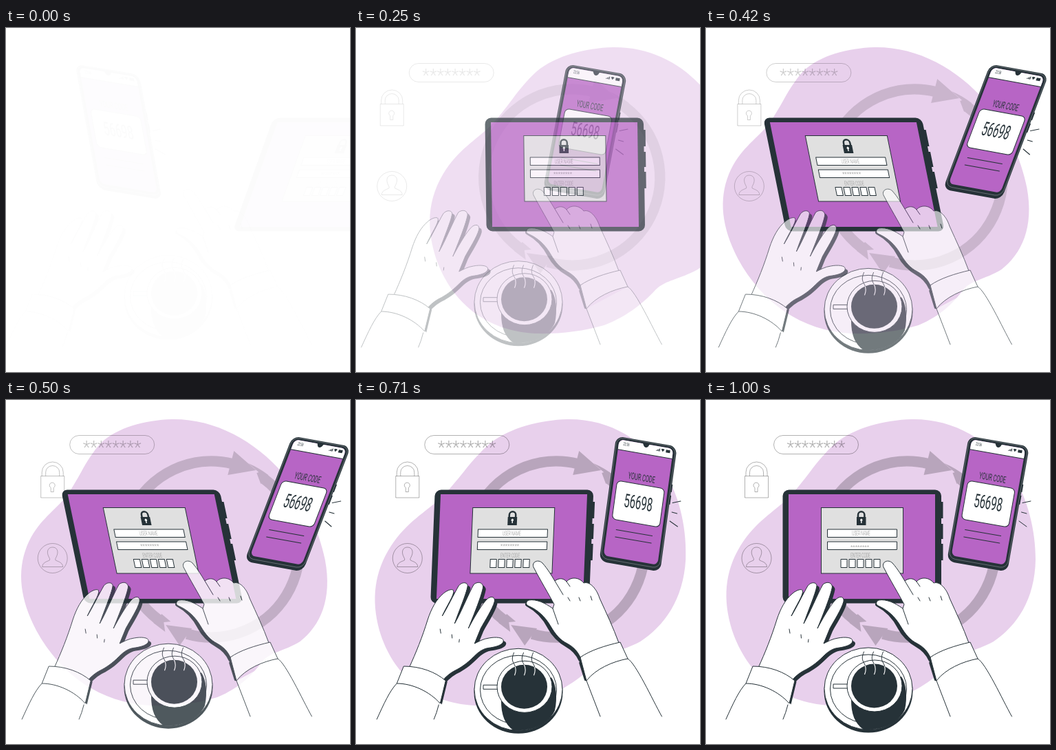
Write an HTML page that moves like this. It is 500x500 px and loops after 1040 ms.

```html
<!DOCTYPE html>
<html lang="en">
<head>
<meta charset="utf-8">
<title>Two-step sign in</title>
<style>
  html, body { margin: 0; width: 100%; height: 100%; overflow: hidden; background: #fff; }
  svg { display: block; width: 100vw; height: 100vh; }
  text { font-family: Roboto, "Liberation Sans", sans-serif; text-anchor: middle; }
  .ink { fill: #263238; }
  .line { fill: none; stroke: #263238; stroke-width: 1; stroke-linecap: round; stroke-linejoin: round; }
  .paper { fill: #fff; stroke: #263238; stroke-width: 1; stroke-linejoin: round; }
  .screen { fill: #b765c5; }
  .faint { fill: none; stroke: #000; stroke-opacity: .3; stroke-width: 1; }
  .label { fill: #8c8c8c; font-size: 9px; font-weight: 300; }
</style>
</head>
<body>
<svg viewBox="0 0 500 500">
  <defs>
    <path id="palm" d="M76 389C86 367 95 345 103 319C108 304 115 290 126 281C132 276 139 274 140.500 277C142 283 130 300 124 314C131 303 141 282 148 270C152 265 159 264 161 269C161 277 149 305 142 325C150 312 163 280 170 268C175 264 182 264 183.500 271C182 283 170 312 162 332C170 317 183 294 191 288C196 285 201 286 200 293C197 304 186 321 180 332L171 354C177 351 184 347 192 346C202 344 213 345 213 350C213 356 201 359 194 360C184 361 178 365 170 373C160 383 151 389 143 393C135 397 130 402 126 406Z"/>
    <path id="cuffL" d="M68 387C92 387 114 395 129 408L121 441C106 424 81 412 58 412Z"/>
    <path id="steam" d="M229.500 366c-3 7-3 11 0 16s4 10 1 17M243.500 366c-3 7-3 11 0 16s4 10 1 17M257.500 366c-3 7-3 11 0 16s4 10 1 17"/>
    <clipPath id="inCup"><ellipse cx="244.500" cy="415.500" rx="33.500" ry="32"/></clipPath>
  </defs>

  <g id="blob">
    <path fill="#e8d0ec" d="M299 28C360 27 412 58 445 108C468 143 479 190 479 232C478 290 452 328 418 351C390 366 372 366 357 380C342 396 318 418 281 432C250 441 215 445 180 444C110 440 60 400 38 335C24 290 27 250 50 212C72 177 98 163 119 143C145 117 158 90 188 63C216 40 260 29 299 28Z"/>
  </g>

  <g id="ring">
    <g opacity=".2" transform="translate(1.500 0)">
      <path id="arcs" fill="none" stroke="#000" stroke-width="15.500"/>
      <path d="M324 74L356 102L315 109ZM345 92Q361 99 374 109L363 122L357 106L360 105Z"/>
      <path d="M225 327L263 332L245 357ZM232 322L219 311L207 324L224 337L222 323Z"/>
    </g>
  </g>

  <g id="icons">
    <rect class="faint" x="98.500" y="51.500" width="123" height="27" rx="13.500"/>
    <text x="160" y="78.300" font-size="25" font-weight="300" fill-opacity=".31">********</text>
    <path class="faint" d="M56.500 110.500h34v31.500h-34zM58 110.500V105a15.500 15 0 0 1 31 0v5.500M63.500 110.500V105a10 9.500 0 0 1 20 0v5.500"/>
    <path class="faint" d="M71 127.500a4 4 0 1 1 4 0v6h-4z"/>
    <circle class="faint" cx="73.500" cy="230" r="21.500"/>
    <path class="faint" d="M58.500 242.500C59 236 65 235 69 233C70 231 69 230 68 228C64 220 67 214 73.500 214S83 220 79 228C78 230 77 231 78 233C82 235 88 236 88.500 242.500Z"/>
  </g>

  <g id="phone">
    <g transform="translate(410 151) rotate(10) scale(1.015)">
      <path class="ink" d="M42-36h3v11h-3zM42-20h3v13h-3z"/>
      <rect class="ink" x="-44" y="-91" width="88" height="182" rx="11"/>
      <rect x="-42.500" y="-89.700" width="85" height="176" rx="10" fill="none" stroke="#9aa0a3" stroke-width=".5"/>
      <rect class="screen" x="-39" y="-87" width="78" height="169" rx="7"/>
      <path fill="#fff" d="M-39-72.500V-80a7 7 0 0 1 7-7h64a7 7 0 0 1 7 7v7.500z"/>
      <path class="line" d="M-39-72.500h78"/>
      <path class="ink" d="M-6-88c2 0 2 6 6 6s4-6 6-6z"/>
      <text class="ink cond" data-x="-28" data-y="-79.500" font-size="6.500">23:56</text>
      <path class="ink" d="M15-80v-1h1v1zM16.500-80v-2h1v2zM18-80v-3h1v3zM19.500-80v-4h1v4zM22-83.500q2.500-1.500 5 0l-2.500 3.500zM29-84h6v4h-6z"/>
      <text class="ink cond" data-x="0" data-y="-33.500" font-size="13.400">YOUR CODE</text>
      <rect class="paper" x="-34" y="-28" width="68.500" height="56" rx="6"/>
      <text class="ink cond" data-x="0" data-y="7.500" font-size="27">56698</text>
      <path class="line" d="M-26 42h52M-26 52.500h52"/>
    </g>
    <path class="line" d="M460 149.500L472 147M458.500 163L466 165M455 176L466 184"/>
  </g>

  <g id="tablet">
    <path class="ink" d="M339 148h5.500v24H339zM339 180h5.500v22H339zM339 209h5.500v24H339z"/>
    <rect class="ink" x="111.500" y="130.500" width="230.500" height="165" rx="9"/>
    <rect class="screen" x="120" y="137" width="213" height="152"/>
    <rect x="167.500" y="156.500" width="119" height="95.500" fill="#e0e0e0" stroke="#263238"/>
    <path class="line" style="stroke-width:2.500" d="M221 171v-4a4.700 4.700 0 0 1 9.400 0v4"/>
    <rect class="ink" x="219" y="170" width="13.500" height="12"/>
    <path fill="#fff" d="M225.100 176a1.700 1.700 0 1 1 1.400 0v3h-1.400z"/>
    <rect class="paper" x="176.500" y="188" width="101" height="11.500"/>
    <rect class="paper" x="176.500" y="206" width="101" height="11.500"/>
    <text class="label cond" data-x="225.500" data-y="197">USER NAME</text>
    <text class="label" x="223.500" y="215.500" style="font-size:8px">********</text>
    <text class="label cond" data-x="224.500" data-y="229.300">ENTER CODE</text>
    <path class="paper" d="M196 231.500h9v12h-9zM208 231.500h9v12h-9zM220 231.500h9v12h-9zM232 231.500h9v12h-9zM244 231.500h9v12h-9z"/>
  </g>

  <g id="cup">
    <ellipse class="ink" cx="236" cy="423.500" rx="64.500" ry="60"/>
    <ellipse class="paper" cx="236" cy="419.500" rx="64" ry="59.500"/>
    <ellipse class="paper" cx="236" cy="420" rx="55.500" ry="50"/>
    <path class="ink" d="M211 436C211 456 216 470 229 479C256 480 280 470 289 450C293 432 291 412 284 402Z"/>
    <rect class="paper" x="185" y="413" width="22" height="6"/>
    <ellipse class="paper" cx="245" cy="415.500" rx="40" ry="37.500"/>
    <ellipse class="ink" cx="244.500" cy="415.500" rx="33.500" ry="32"/>
    <use href="#steam" class="line"/>
    <g clip-path="url(#inCup)"><use href="#steam" fill="none" stroke="#fff" stroke-width="1.100"/></g>
  </g>

  <g id="left">
    <use href="#palm" class="ink" x="4" y="4"/>
    <use href="#cuffL" class="ink" x="2.500" y="1.500"/>
    <use href="#palm" class="paper"/>
    <path fill="#fff" d="M58 412C48 422 39 442 29 464H112L121 441C106 424 81 412 58 412Z"/>
    <path class="line" d="M29 464C39 442 48 422 58 412M112 464Q116 455 119 443"/>
    <use href="#cuffL" class="paper"/>
    <path class="line" d="M121 333l1 6M138 341l.5 5M149 348l-.5 4"/>
  </g>

  <g id="right">
    <path class="line" style="stroke-width:6" d="M249 297C262 304 273 314 281 330C288 343 297 351 307 356.500C315 361 322 368 326 377"/>
    <path class="line" style="stroke-width:4.500" d="M326.500 382L334 406"/>
    <path class="paper" d="M326 374C322 365 316 359 307 354C297 349 290 341 283 329C275 315 264 305 251 299.500C246 297 247 293 251 291C262 289 275 295 286 303L288 297C280 282 268 262 258 243C255 235 265 231 271 237C279 246 284 255 289 263C294 259 301 258 306 264C312 257 324 257 331 266C340 263 350 275 354 288C364 310 374 331 382 353Z"/>
    <path class="line" d="M286 303L294 326M289 263L301 283M306 264l5 7"/>
    <path fill="#fff" d="M335 408L355 460H444C430 434 407 383 395 376Z"/>
    <path class="line" d="M335 408L355 460M395 376C407 383 430 434 444.500 460"/>
    <path class="paper" d="M326 374C340 364 362 357 384 352L395 376C373 380 348 391 335 408Z"/>
    <path class="line" d="M308 287l3 5M324 287l2 5M341 285l2 6"/>
  </g>
</svg>
<script>
  const LOOP = 1040, STEP = 41.6, LEAD = 34;
  const $ = id => document.getElementById(id);

  // Condensed lettering shared by all labels
  for (const el of document.querySelectorAll('.cond')) {
    const { x, y } = el.dataset;
    el.setAttribute('transform', `translate(${x} ${y}) scale(.54 1)`);
  }

  function arc(cx, cy, r, from, to) {
    const at = a => [cx + r * Math.cos(a * Math.PI / 180), cy + r * Math.sin(a * Math.PI / 180)].join(' ');
    return `M${at(from)}A${r} ${r} 0 ${to - from > 180 ? 1 : 0} 1 ${at(to)}`;
  }
  $('arcs').setAttribute('d', arc(291, 217, 128, 127, 284) + arc(291, 217, 128, -53, 106));

  // cubic-bezier(.36, -.01, .5, 1.38)
  const curve = (s, a, b) => 3 * a * s * (1 - s) ** 2 + 3 * b * s * s * (1 - s) + s ** 3;
  function ease(x) {
    if (x <= 0) return 0;
    if (x >= 1) return 1;
    let lo = 0, hi = 1;
    for (let i = 0; i < 30; i++) {
      const mid = (lo + hi) / 2;
      if (curve(mid, .36, .5) < x) lo = mid; else hi = mid;
    }
    return curve(lo, -.01, 1.38);
  }

  function place(id, matrix, opacity) {
    const el = $(id);
    el.setAttribute('transform', `matrix(${matrix.join(' ')})`);
    el.setAttribute('opacity', Math.max(0, Math.min(1, opacity)));
  }

  function slide(id, dx, dy, t) {
    const k = ease(t);
    place(id, [1, 0, 0, 1, dx * (1 - k), dy * (1 - k)], k);
  }

  // Fly in sideways while leaning, then wobble upright around height y0
  function dash(id, dir, y0, t) {
    let dx = 0, lean, opacity = 1;
    if (t < .6) {
      const k = ease(t / .6);
      dx = 250 * (1 - k);
      lean = -20 + 30 * k;
      opacity = k;
    } else if (t < .8) {
      lean = 10 - 12 * ease((t - .6) / .2);
    } else {
      lean = -2 + 2 * ease((t - .8) / .2);
    }
    const tan = dir * Math.tan(lean * Math.PI / 180);
    place(id, [1, 0, tan, 1, dir * dx - tan * y0, 0], opacity);
  }

  function draw(ms) {
    // The opening pose holds for two ticks
    const tick = ms < 80 ? 0 : Math.floor(ms / STEP + .1);
    const t = (tick * 1000 / 24 + LEAD) / 1000;
    dash('blob', 1, 236, t);
    dash('tablet', 1, 213, t);
    dash('phone', -1, 148, t);
    slide('ring', 30, 0, t);
    slide('icons', -30, 0, t);
    slide('left', -30, 0, t);
    slide('cup', 0, -30, t);
    slide('right', 0, 0, t);
  }

  const start = performance.now();
  function loop() {
    draw((performance.now() - start) % LOOP);
    requestAnimationFrame(loop);
  }
  loop();
</script>
</body>
</html>
```
